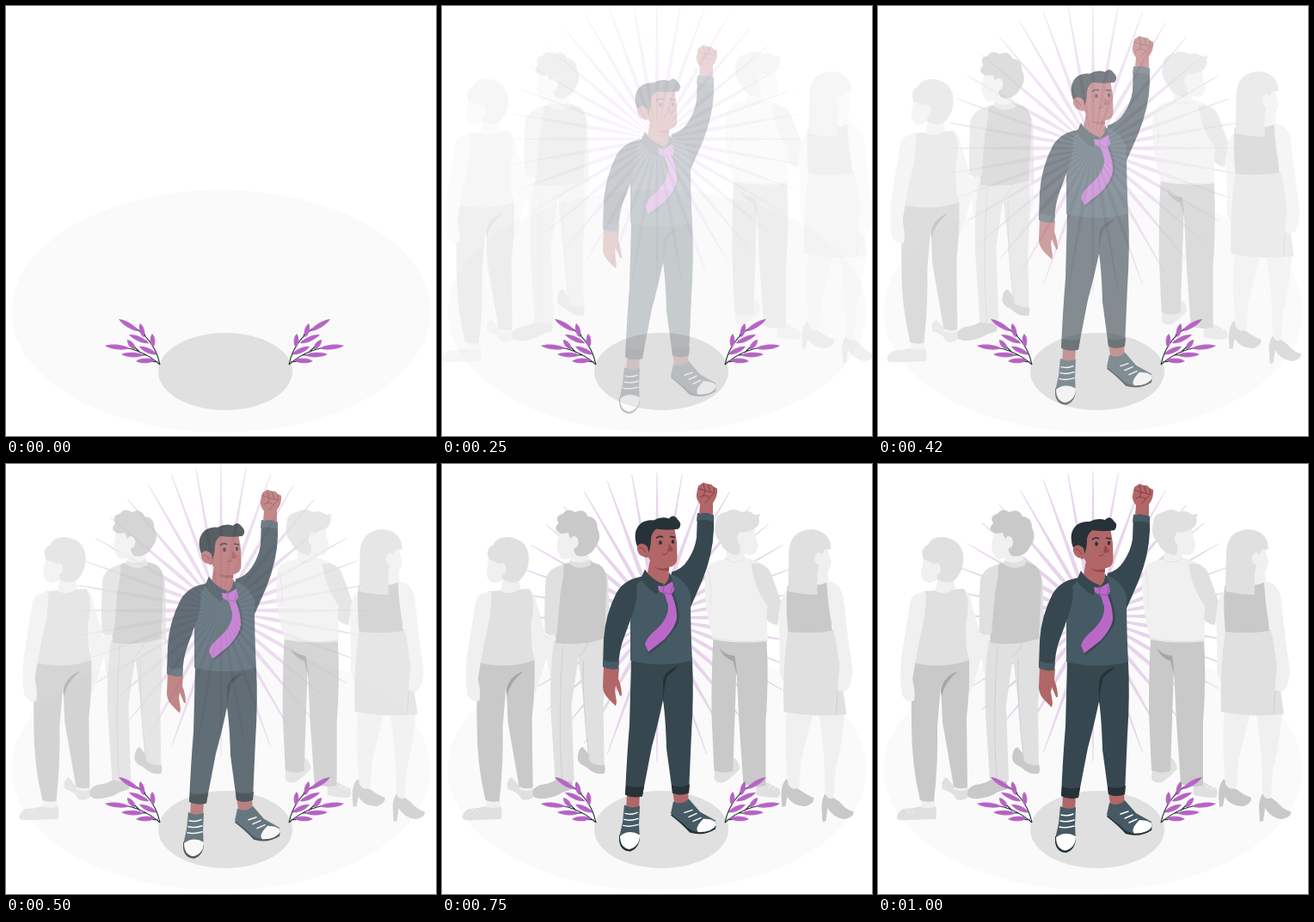
These frames come from a looping animation (500 px wide and 500 px high, 1.04 s). An HTML page:

```html
<!DOCTYPE html>
<html lang="en">
<head>
<meta charset="utf-8">
<title>Standing out</title>
<style>
  html, body { margin: 0; width: 100%; height: 100%; overflow: hidden; background: #fff; }
  svg { display: block; width: 100vw; height: 100vh; }
  .light { fill: #f0f0f0; }
  .mid { fill: #e0e0e0; }
  .dark { fill: #c9c9c9; }
  .fold { fill: #a6a6a6; }
  .seam { fill: none; stroke: #c9c9c9; stroke-width: .8; }
  .edge { fill: none; stroke: #e0e0e0; stroke-width: .8; }
  .skin { fill: #b16668; }
  .shade { fill: #9a4a4d; }
  .crease { fill: none; stroke: #7f3e3b; stroke-width: .9; stroke-linecap: round; }
  .cloth { fill: #37474f; }
  .vest { fill: #455a64; }
  .ink { fill: #263238; }
  .lace { fill: none; stroke: #fff; stroke-width: 1.5; stroke-linecap: round; }
</style>
</head>
<body>
<svg viewBox="0 0 500 500">
  <ellipse cx="250" cy="355" rx="243.5" ry="141" fill="#fafafa"/>
  <g id="rays" fill="#e8d3ed"></g>
  <ellipse cx="255" cy="425" rx="78" ry="45" fill="#e0e0e0"/>

  <g id="left">
    <g>
      <path class="light" d="M183 190L191 200Q195 225 190 238Q184 240 183 228L176 200Z"/>
      <path class="light" d="M121 190L133 192L132 240Q130 250 125 248Q119 235 121 190Z"/>
      <path class="dark" d="M162 329Q157 330 156 342Q156 348 167 353Q176 362 187 360Q189 355 187 349L177 347Z"/>
      <path class="dark" d="M133 366Q124 372 113 373Q103 376 103 385Q106 390 118 389Q132 387 138 382L150 378L150 366Z"/>
      <path class="mid" d="M129 205L187 202Q190 240 186 280L187 350Q178 352 169 345L164 285L157 225L149 280L152 368Q141 371 130 367L125 290Q123 240 129 205Z"/>
      <path class="seam" d="M163 228Q161 280 170 346M139 212Q133 290 138 368M157 224Q165 217 168 208"/>
      <path class="mid" d="M179 116Q191 122 192 142L193 205L180 203Z"/>
      <path class="dark" d="M149 114Q133 117 127 126L131 208Q160 212 187 203L190 140Q190 122 181 117L169 113Z"/>
      <path class="mid" d="M140 117Q123 120 119 134Q117 160 118 196Q124 201 132 197L136 150Q140 132 140 117Z"/>
      <path class="light" d="M148 104L167 102L171 115Q158 124 147 115Z"/>
      <path class="mid" d="M147 112Q158 118 169 111L172 117Q158 125 146 116Z"/>
      <path class="light" d="M136 73L132 94Q133 108 140 111Q150 110 154 103L157 85L150 72Z"/>
      <path class="dark" d="M137 81Q126 76 134 69Q129 60 139 58Q144 50 153 56Q164 51 168 61Q179 62 179 74Q185 86 177 96Q171 109 156 107Q151 103 152 97L145 80Z"/>
      <ellipse class="light" cx="152" cy="91" rx="5" ry="7"/>
    </g>
    <g>
      <path class="light" d="M99 146Q106 148 109 164L122 207Q125 215 119 229L108 264Q102 275 99 263L105 218L97 185Z"/>
      <path class="mid" d="M79 364Q72 370 75 378Q87 381 91 390Q99 392 104 388L104 376L88 374Z"/>
      <path class="light" d="M89 372L103 374L103 379Q96 382 88 378ZM50 388L66 388L66 403L50 403Z"/>
      <path class="mid" d="M49 398Q39 401 29 401Q22 405 22 412Q24 415 35 414L67 413Q69 406 67 398Q58 402 49 398Z"/>
      <path class="edge" style="stroke:#f0f0f0" d="M38 401L42 406M33 402L37 407"/>
      <path class="dark" d="M42 229L106 228Q107 262 103 295L104 376Q96 379 88 375L75 300L73 258L69 305Q70 350 65 392Q57 394 49 391Q39 350 39 305Q38 262 42 229Z"/>
      <path class="fold" d="M93 241Q77 246 73 263L74 270Q77 254 93 241Z"/>
      <path class="mid" d="M53 148L100 145Q108 160 102 185Q101 207 106 228Q76 239 41 231Q46 200 45 168Z"/>
      <path class="light" d="M56 149Q42 149 38 158L27 226Q25 250 28 269Q35 279 42 275Q44 265 40 250L48 205Q56 178 56 149Z"/>
      <path class="light" d="M69 135L87 133L90 145Q78 153 67 148Z"/>
      <path class="light" d="M54 106L50 126Q51 138 59 138Q66 138 72 132L76 112Z"/>
      <path class="mid" d="M53 111Q48 99 58 94Q62 84 77 85Q96 88 99 105Q101 124 88 136Q78 140 69 134Q68 126 69 118L61 114Z"/>
      <ellipse class="light" cx="68" cy="122" rx="5" ry="7"/>
    </g>
  </g>

  <g id="right">
    <g>
      <path class="mid" d="M319 347L318 366Q321 372 330 370Q342 362 348 354Q347 345 340 341ZM367 371L367 385Q378 388 392 388Q397 383 393 377L379 370Z"/>
      <path class="edge" style="stroke:#fff" d="M381 377L385 373M386 379L390 375"/>
      <path class="dark" d="M317 202L379 204Q382 250 378 300L378 374Q365 377 352 372L347 300L344 238L340 357Q329 361 318 356L315 290Q315 240 317 202Z"/>
      <path class="fold" d="M324 213Q329 222 342 223L345 247L340 229Q328 225 324 213Z"/>
      <path class="light" d="M333 111Q313 112 309 124Q303 155 317 204Q347 210 380 206L379 121Q366 110 353 109Z"/>
      <path class="mid" d="M361 116Q378 113 384 127L396 160Q398 168 393 176L392 187Q385 187 379 181L380 165Q364 143 361 116Z"/>
      <path class="edge" d="M311 124Q315 140 314 165M318 203Q350 209 380 205"/>
      <path class="light" d="M333 99L352 101L354 110Q345 120 332 112Z"/>
      <path class="edge" d="M332 110Q342 119 355 109"/>
      <path class="light" d="M364 73L369 95Q368 105 360 106Q351 105 346 100L343 80Z"/>
      <path class="mid" d="M364 76Q373 70 370 62L372 58L365 59Q359 53 350 56Q341 50 331 56Q320 58 320 68Q316 82 325 91Q330 104 344 106Q350 104 348 97L352 80Z"/>
      <ellipse class="light" cx="350" cy="87" rx="5" ry="8"/>
    </g>
    <g>
      <path class="dark" d="M402 366Q396 373 396 385L397 399L401 398L403 387Q411 399 425 398Q435 394 434 388Q424 384 418 379L412 376Z"/>
      <path class="dark" d="M449 381Q443 388 443 399L444 416L448 415L450 400Q457 412 470 413Q482 410 480 404Q471 402 464 393L457 388Z"/>
      <path class="light" d="M404 145Q394 155 393 178Q395 215 394 239Q396 253 402 255L407 195Z"/>
      <path class="light" d="M403 285H434L419 345L417 376Q409 381 404 372Q399 325 403 285ZM439 285H470Q467 330 459 355L457 388Q451 392 447 383Q447 330 439 285Z"/>
      <path class="mid" d="M404 193L461 192Q464 240 472 291Q435 295 399 288Q397 240 404 193Z"/>
      <path class="seam" d="M462 255L460 290"/>
      <path class="dark" d="M407 137L449 136Q454 165 455 194Q432 198 404 195Q401 165 403 143Z"/>
      <path class="light" d="M449 136Q464 138 468 153L475 212L479 240Q478 261 469 265L461 263L464 235L459 202Q451 178 449 136Z"/>
      <path class="light" d="M432 121L450 123L451 136Q442 143 428 139Z"/>
      <path class="light" d="M449 95L454 114Q453 125 446 127Q438 127 432 119L433 98Z"/>
      <path class="mid" d="M405 101Q407 77 431 76Q448 77 453 91L454 99L446 100Q442 108 438 126V152Q420 152 404 148Z"/>
      <ellipse class="light" cx="440" cy="110" rx="5" ry="7"/>
    </g>
  </g>

  <g id="hero">
    <path class="skin" d="M215 383H230L229 406H214ZM268 381H286L287 398L271 402Z"/>
    <path class="vest" d="M212 398Q221 403 230 399L229 420L230 438Q225 449 212 446L206 436L210 418Z"/>
    <path class="ink" d="M206 433L206 440Q208 452 219 452Q230 448 230 434L228 432Z"/>
    <path fill="#fff" d="M207 434Q218 426 230 433Q230 446 218 449.5Q207 448 207 434Z"/>
    <path class="lace" d="M213 408Q220 410 227 407M212 415Q219 417 228 414M211 422Q218 424 228 421"/>
    <path class="ink" d="M266 410Q279 420 288 430Q304 435 318 426L319 419L270 405Z"/>
    <path class="vest" d="M269 394Q279 399 287 391L300 406L318 416Q315 428 300 430Q289 429 282 421L266 408Z"/>
    <path fill="#fff" d="M304 414Q318 414 319 421Q314 430 298 429.5Q293 425 304 414Z"/>
    <path class="lace" d="M282 407L291 404M287 412L296 408M292 417L301 413"/>

    <path class="skin" d="M188 236L206 238L205 251Q209 261 209 271L207 271L202 259L201 265L203 278L202 283L196 277Q187 269 187 260Z"/>
    <path class="cloth" d="M220 230H291Q293 270 290 315L287 384Q277 388 268 384L261 332Q260 296 257 276Q251 305 244 330L233 387Q222 390 213 386Q215 340 218 305Z"/>
    <path class="ink" d="M214 375Q224 379 235 376L233 388Q222 391 213 386ZM267 375Q277 379 288 374L287 384Q277 388 268 384ZM276 236Q260 240 257 253L257 278Q258 262 262 248Q267 244 276 236Z"/>
    <path class="cloth" d="M297 59Q307 56 316 61L316 78Q315 106 303 136L289 168L264 150L267 127Q279 124 286 113Q294 101 296 87Z"/>
    <path class="vest" d="M297 59Q307 56 316 61L316 69Q306 65 296 68Z"/>
    <path class="vest" d="M236 131L268 130Q284 137 289 153Q289 195 291 230Q255 239 219 230L219 185L222 136Z"/>
    <path class="cloth" d="M236 132Q213 134 203 151Q190 176 188 205L187 237Q197 242 205 239Q206 218 211 205L219 183Q229 158 226 142Z"/>
    <path class="vest" d="M187 229Q197 233 206 231L205 239Q197 242 187 237Z"/>

    <path class="skin" d="M242 112L262 116L264 130Q266 140 258 143Q247 138 239 129Z"/>
    <path class="shade" d="M247 121Q256 125 264 121V126Q253 127 247 121Z"/>
    <path class="cloth" d="M236 124Q243 136 258 141L250 153Q238 146 231 135ZM264 127L269 139L267 149L258 142Q265 137 264 127Z"/>
    <path class="ink" opacity=".45" d="M268 148Q278 170 275 186Q266 204 242 222L239 219L265 188Z"/>
    <path fill="#ba68c8" d="M251 143L258 144L268 138L270 148L267 153C271 162 273 170 273 181Q271 192 259 205L240 220L236 211Q238 203 249 194Q264 180 263 166L259 153L252 149Z"/>
    <path fill="none" stroke="#8c4e96" stroke-width=".8" d="M258 144L257 151L266 153L268 143"/>

    <path class="skin" d="M239 82Q251 70 270 74L273 92L273.5 110Q274 120 264 121.5Q252 125 244 117L236 104Z"/>
    <path class="ink" d="M238 111Q235 106 230 105Q223 90 225 81Q229 66 246 67Q255 62 264 65Q269 59 274 66Q280 71 275 77Q263 79 249 77Q243 82 243 89Q243 98 238 111Z"/>
    <path class="skin" d="M239 98Q232 91 227 97Q226 108 237 110L241 107Z"/>
    <path class="shade" d="M264 94L269 101Q268 104 262 103Z"/>
    <path class="crease" d="M230 99Q234 99 236 104M257 107Q260 107 262 105"/>
    <ellipse class="ink" cx="254" cy="93" rx="1.8" ry="2.4"/>
    <ellipse class="ink" cx="268.5" cy="92" rx="1.7" ry="2.4"/>
    <path fill="none" stroke="#263238" stroke-width="1.6" d="M249 88Q253 84 257 87M265 86L271 87"/>

    <path class="skin" d="M299 60L300 48Q295 42 296 36L298 27L304 23L309 25L313 25L316 28L320 30Q321 39 315 47L315 61Q306 56 299 60Z"/>
    <path class="crease" d="M298 30L306 33L304 39M304 25L306 33L312 34L309 25M312 34L317 36L316 29M300 40Q307 36 311 41L306 47M311 41L315 37"/>
  </g>

  <defs>
    <g id="plant">
      <path d="M179 417Q172 383 137 367M179 417Q157 397 122 395M176 405L160 400M170 392L171 386M162 384L158 374M164 390L150 385M156 403L145 392M164 406L140 405M177 414L155 412" fill="none" stroke="#263238" stroke-width="1.1"/>
      <g id="leaves" fill="#ba68c8" stroke="#9a56a6" stroke-width=".5"></g>
    </g>
  </defs>
  <use href="#plant"/>
  <use href="#plant" transform="translate(508 0) scale(-1 1)"/>
</svg>
<script>
const $ = id => document.getElementById(id);
const [rays, left, right, hero] = ["rays", "left", "right", "hero"].map($);
const FPS = 24, LOOP = 1040, TRAVEL = 30;

rays.innerHTML = Array.from({ length: 36 }, (_, i) =>
  `<path d="M250 177L247.7 115L249.6 8H250.4L252.3 115Z" transform="rotate(${i * 10} 250 177)"/>`).join("");

// Tip x, tip y, base x, base y
const leaves = [
  [131, 364, 154, 378], [143, 382, 166, 392], [156, 369, 160, 385],
  [170, 381, 171, 397], [155, 396, 175, 405], [141, 388, 150, 399],
  [115, 395, 143, 398], [134, 405, 160, 406], [151, 413, 173, 412]
];
const LEAF_BULGE = 3.8;
$("leaves").innerHTML = leaves.map(([x, y, u, v]) => {
  const dx = u - x, dy = v - y, len = Math.hypot(dx, dy);
  const at = (along, side) =>
    `${x + dx * along - dy / len * side} ${y + dy * along + dx / len * side}`;
  const w = LEAF_BULGE;
  return `<path stroke="none" d="M${x} ${y}C${at(.25, w)} ${at(.8, w)} ${u} ${v}C${at(.8, -w)} ${at(.25, -w)} ${x} ${y}"/>` +
    `<path d="M${at(.15, 0)}L${u} ${v}"/>`;
}).join("");

const bezier = (s, a, b) => 3 * (1 - s) ** 2 * s * a + 3 * (1 - s) * s * s * b + s ** 3;

// Cubic ease that overshoots before settling
function ease(x) {
  let lo = 0, hi = 1;
  for (let i = 0; i < 24; i++) {
    const mid = (lo + hi) / 2;
    if (bezier(mid, .36, .5) < x) lo = mid; else hi = mid;
  }
  return bezier(hi, -.01, 1.38);
}

function place(node, x, y, opacity) {
  node.setAttribute("transform", `translate(${x} ${y})`);
  node.setAttribute("opacity", opacity);
}

function draw(ms) {
  const step = Math.floor(ms % LOOP * FPS / 1000 + .25);
  const progress = step < 3 ? 0 : ease(Math.min(1, step / FPS + .018));
  const gap = TRAVEL * (1 - progress), opacity = Math.max(0, Math.min(1, progress));
  place(rays, 0, -gap, opacity);
  place(left, -gap, 0, opacity);
  place(right, gap, 0, opacity);
  place(hero, 0, gap, opacity);
}

const start = performance.now();
function tick() {
  draw(performance.now() - start);
  requestAnimationFrame(tick);
}
tick();
</script>
</body>
</html>
```
